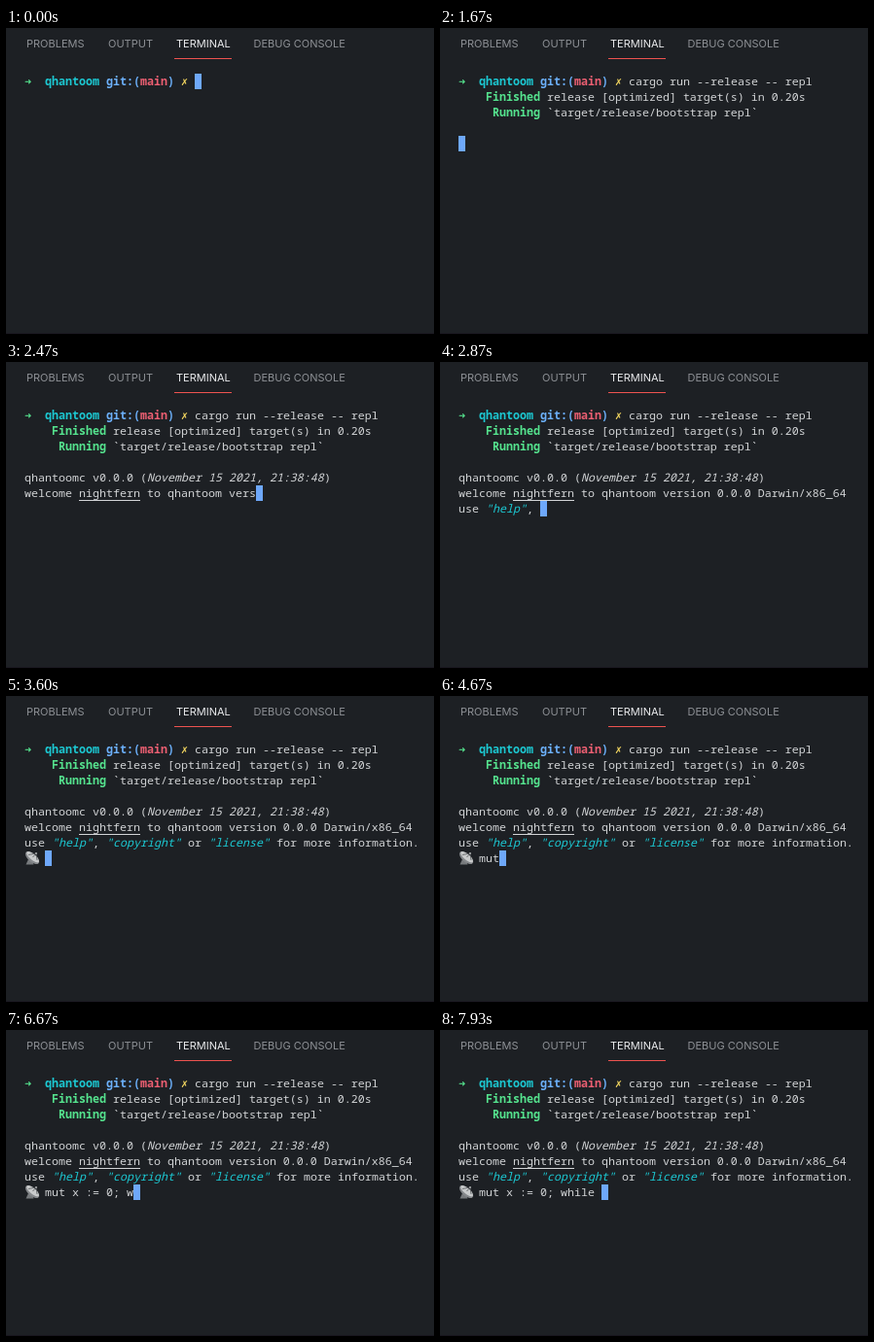
An HTML page that plays this animation: 440 by 315 pixels, repeating every 8000 ms.

```html
<!DOCTYPE html>
<html lang="en">
<head>
<meta charset="utf-8">
<title>Terminal session</title>
<style>
  html, body { margin: 0; width: 100%; height: 100%; overflow: hidden; background: #1d2024; }
  svg { display: block; width: 440px; height: 315px; }
  .tab { font: 11px Inter, Roboto, sans-serif; fill: #8d9095; }
  .tab.on { fill: #e9eaec; }
  .run { font: 11.667px "Noto Sans Mono", "DejaVu Sans Mono", monospace; white-space: pre; fill: #d2d4d6; }
  .b { font-weight: 700; }
  .i { font-style: italic; }
  .sym { font-family: "DejaVu Sans Mono", monospace; }
  .green { fill: #55e38e; }
  .cyan { fill: #1cc8d2; }
  .blue { fill: #6cb0fa; }
  .red { fill: #ec5f72; }
  .yellow { fill: #f6d860; }
</style>
</head>
<body>
<svg viewBox="0 0 440 315">
  <rect width="440" height="315" fill="#1d2024"/>
  <rect y="314" width="440" height="1" fill="#19171f"/>
  <text class="tab" x="21" y="20">PROBLEMS</text>
  <text class="tab" x="105" y="20">OUTPUT</text>
  <text class="tab on" x="175" y="20">TERMINAL</text>
  <text class="tab" x="254.5" y="20">DEBUG CONSOLE</text>
  <rect x="173" y="31" width="59" height="1" fill="#ee5350"/>
  <rect id="cursor" width="7" height="16" fill="#6ea8fa"/>
  <g id="dish">
    <path d="M23 168l-2.5 5.5h8l-2-4z" fill="#777a7d"/>
    <ellipse cx="27" cy="166.5" rx="8.6" ry="4.3" transform="rotate(41 27 166.5)" fill="#85888b"/>
    <ellipse cx="27.6" cy="165.8" rx="8" ry="3" transform="rotate(41 27.6 165.8)" fill="#c9cbcc"/>
    <path d="M23 163.5L31 162L32 169M27.5 166L31 162" fill="none" stroke="#55585b" stroke-width=".8"/>
    <circle cx="31" cy="162" r="1.1" fill="#a4a6a8"/>
  </g>
  <g id="screen"></g>
</svg>
<script>
const LOOP = 8000, LEFT = 19, TOP = 47, CELL = 7, LINE = 16, FRAME = 100 / 3;

// row, column, text, classes, underlined
const runs = [
  [0, 0, "➜", "b sym green"],
  [0, 3, "qhantoom", "b cyan"],
  [0, 12, "git:(", "b blue"],
  [0, 17, "main", "b red"],
  [0, 21, ")", "b blue"],
  [0, 23, "✗", "b sym yellow"],
  [0, 25, "cargo run --release -- repl", ""],
  [1, 4, "Finished", "b green"],
  [1, 13, "release [optimized] target(s) in 0.20s", ""],
  [2, 5, "Running", "b green"],
  [2, 13, "`target/release/bootstrap repl`", ""],
  [4, 0, "qhantoomc v0.0.0 (", ""],
  [4, 18, "November 15 2021, 21:38:48", "i"],
  [4, 44, ")", ""],
  [5, 0, "welcome ", ""],
  [5, 8, "nightfern", "", true],
  [5, 17, " to qhantoom version 0.0.0 Darwin/x86_64", ""],
  [6, 0, "use ", ""],
  [6, 4, '"help"', "i cyan"],
  [6, 10, ", ", ""],
  [6, 12, '"copyright"', "i cyan"],
  [6, 23, " or ", ""],
  [6, 27, '"license"', "i cyan"],
  [6, 36, " for more information.", ""],
  [7, 3, "mut x := 0; while ", ""]
];

// time, cursor row, cursor column
const jumps = [[0, 0, 25], [330, 0, 52], [1230, 1, 0], [1670, 4, 0], [3600, 7, 3]];
const keys = [4170, 4400, 4670, 4870, 5100, 5330, 5570, 5630, 5770,
              6100, 6330, 6570, 6670, 6970, 7200, 7430, 7870, 7930];
// greeting printed letter by letter: tick, letters out
const print = [[50, 0], [65, 54], [86, 116], [108, 163]];
const greetRows = [[4, 45], [5, 57], [6, 58]];

const screen = document.getElementById("screen");
const cursor = document.getElementById("cursor");
const dish = document.getElementById("dish");

function add(tag, attrs) {
  const el = document.createElementNS("http://www.w3.org/2000/svg", tag);
  for (const k in attrs) el.setAttribute(k, attrs[k]);
  return screen.appendChild(el);
}

const parts = runs.map(([row, col, text, cls, under]) => {
  const x = LEFT + col * CELL, y = TOP + row * LINE;
  return {
    row, col, text, shown: 0,
    el: add("text", { x, y: y + 12, class: "run " + cls }),
    line: under && add("rect", { x, y: y + 15, width: 0, height: 1, fill: "#d2d4d6" })
  };
});

function printed(tick) {
  const k = print.findIndex(p => p[0] > tick);
  const [t0, n0] = print[k - 1], [t1, n1] = print[k];
  return Math.floor(n0 + (n1 - n0) * (tick - t0) / (t1 - t0) + 1e-6);
}

function cursorAt(t) {
  let [start, row, col] = jumps.filter(j => j[0] <= t).pop();
  if (row === 4) {
    let n = printed(Math.max(50, Math.min(107, Math.floor((t + 3.4) / FRAME))));
    for (const [r, len] of greetRows) {
      if (n <= len) return [r, n];
      n -= len + 1;
    }
  }
  if (row === 7) col += keys.filter(k => k <= t).length;
  return [row, col];
}

function draw(t) {
  const [row, col] = cursorAt(t);
  cursor.setAttribute("x", LEFT + col * CELL);
  cursor.setAttribute("y", TOP + row * LINE);
  dish.style.display = row === 7 ? "" : "none";
  for (const p of parts) {
    const room = p.row < row ? p.text.length : p.row > row ? 0 : col - p.col;
    const n = Math.max(0, Math.min(p.text.length, room));
    if (n === p.shown) continue;
    p.shown = n;
    p.el.textContent = p.text.slice(0, n);
    if (p.line) p.line.setAttribute("width", n * CELL);
  }
}

const begin = performance.now();
function tick() {
  draw((performance.now() - begin) % LOOP);
  requestAnimationFrame(tick);
}
tick();
</script>
</body>
</html>
```
